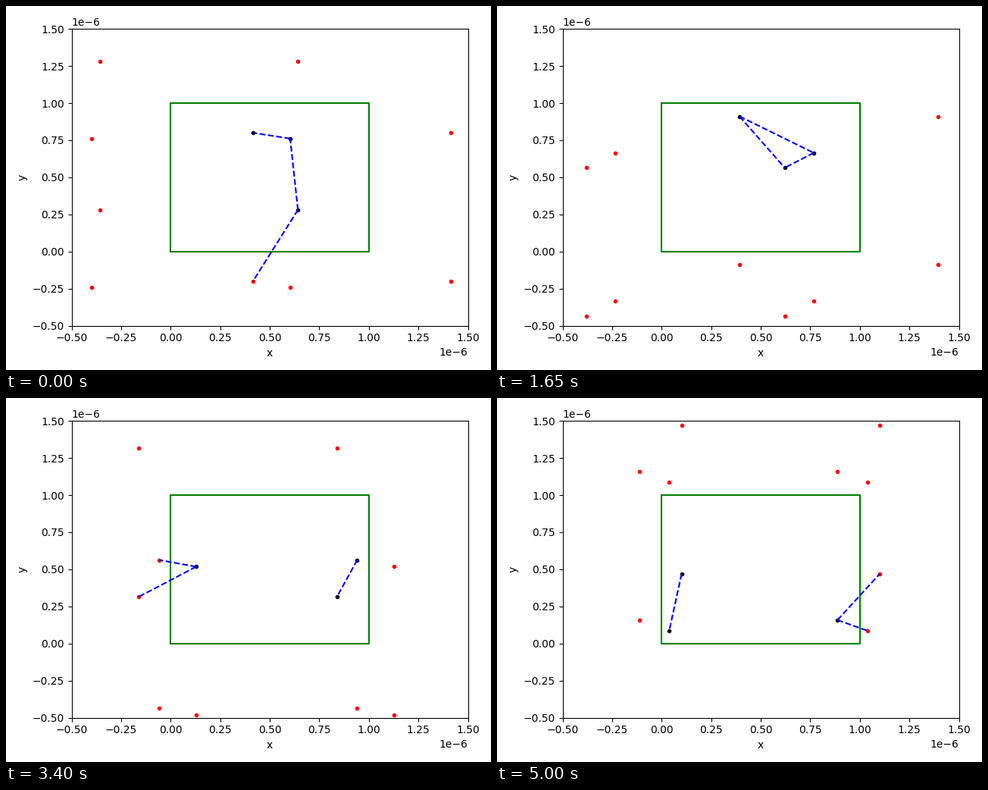
A matplotlib script for the animation above (5.05 s loop, 640 by 480 pixels).

```python
from itertools import combinations

import matplotlib.pyplot as plt
import numpy as np
from matplotlib.animation import FuncAnimation

L = 1e-6          # side of the periodic box
FRAMES = 101
INTERVAL = 50     # ms

# start and velocity (per second) of each particle, in box sides
START = np.array([[0.642, 0.281], [0.603, 0.761], [0.415, 0.800]])
SPEED = np.array([[-0.1510, -0.2245], [0.0995, -0.0582], [0.1246, -0.1427]])
PAIRS = list(combinations(range(3), 2))

fig, ax = plt.subplots(figsize=(6.4, 4.8), dpi=100)
ax.set(xlim=(-0.5 * L, 1.5 * L), ylim=(-0.5 * L, 1.5 * L), xlabel="x", ylabel="y")
ax.plot([0, L, L, 0, 0], [0, 0, L, L, 0], "g-")

ghosts, dots, links = [], [], {}
for i in range(3):
    ghosts += ax.plot([], [], "r.")
    dots += ax.plot([], [], "k.")
for pair in PAIRS:
    links[pair], = ax.plot([], [], "b--")
fig.tight_layout()


def copies(p):
    """The particle itself, then its three nearest periodic copies."""
    dx, dy = np.where(p > 0.5, -1, 1)
    return p + np.array([[0, 0], [dx, 0], [0, dy], [dx, dy]])


def update(frame):
    pos = (START + SPEED * frame * INTERVAL / 1000) % 1
    sets = [copies(p) for p in pos]
    for dot, ghost, pts in zip(dots, ghosts, sets):
        dot.set_data(*(pts[:1] * L).T)
        ghost.set_data(*(pts[1:] * L).T)
    for (i, j), link in links.items():
        dist = np.hypot(*(sets[j] - pos[i]).T)
        near = sets[j][dist.argmin()]
        link.set_data(*(np.array([pos[i], near]) * L).T)
    return [*ghosts, *dots, *links.values()]


anim = FuncAnimation(fig, update, frames=FRAMES, interval=INTERVAL,
                     repeat=True, repeat_delay=0)
plt.show()
```
